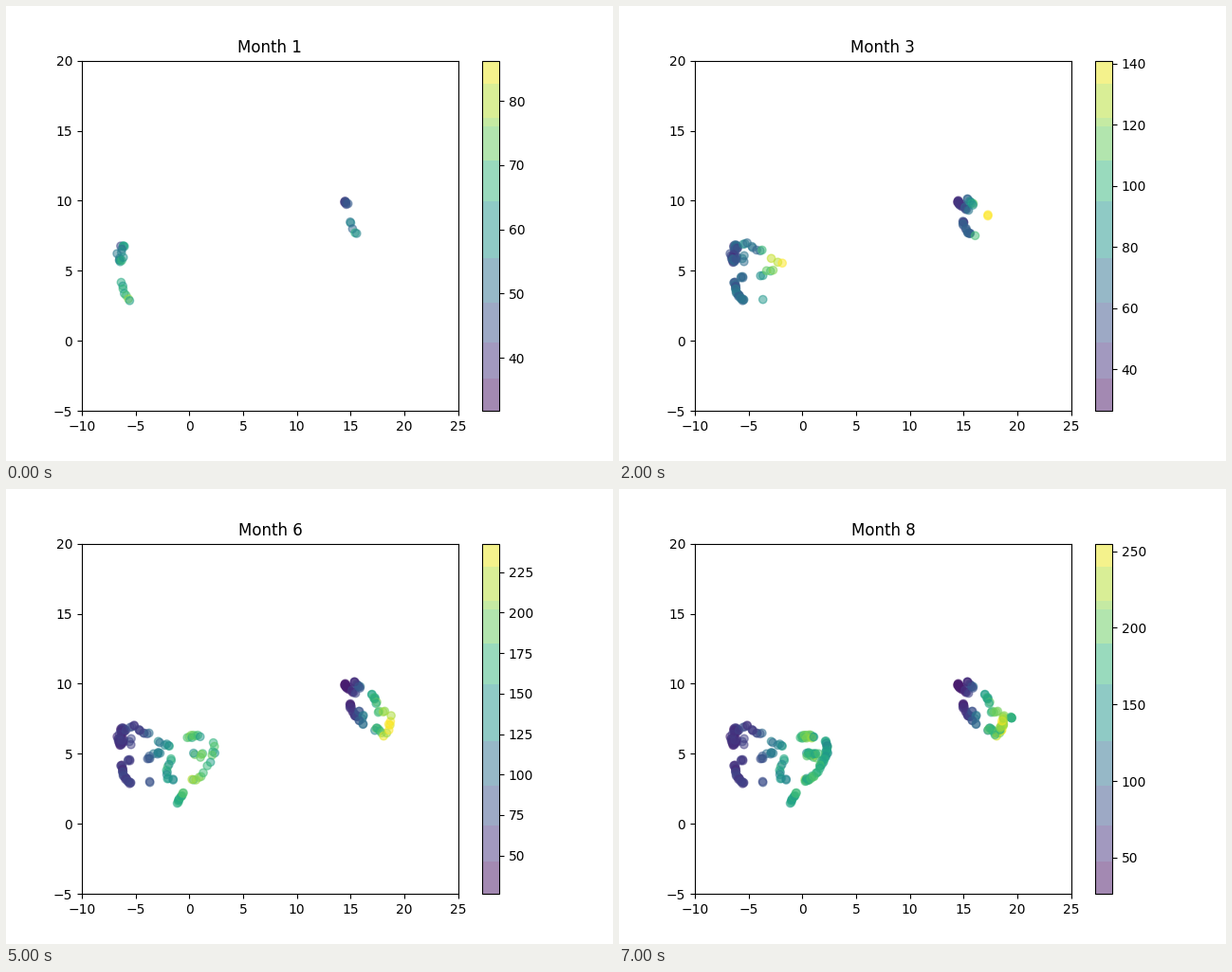
A matplotlib script for the animation above (8000 ms loop, 640 by 480 pixels).

```python
import numpy as np
import matplotlib.pyplot as plt
from matplotlib.animation import FuncAnimation
from matplotlib.cm import ScalarMappable
from matplotlib.colors import ListedColormap, Normalize

ALPHA = 0.5
MONTHS = 8
rng = np.random.default_rng(7)

# Each path: key points, jitter, {month: number of new dots}
WEST = [
    ([(-6.5, 6.8), (-6.0, 6.7), (-6.6, 6.1), (-6.5, 5.7), (-6.0, 6.0)], 0.13,
     {1: 13, 2: 10, 3: 12, 4: 6}),
    ([(-6.35, 4.3), (-6.1, 3.4), (-5.4, 2.8)], 0.07, {1: 7, 2: 8, 3: 7}),
    ([(-5.7, 6.9), (-5.0, 7.0), (-4.4, 6.4), (-3.4, 6.6)], 0.08,
     {2: 3, 3: 5, 4: 2, 5: 1}),
    ([(-5.5, 6.2), (-5.5, 5.5)], 0.1, {2: 1, 3: 2}),
    ([(-5.8, 4.55), (-5.5, 4.5)], 0.08, {2: 2, 3: 2}),
    ([(-4.0, 4.5), (-3.4, 5.0), (-2.4, 5.0)], 0.1, {2: 2, 3: 3, 4: 2, 5: 2}),
    ([(-3.2, 5.8), (-2.2, 5.7), (-1.8, 5.4)], 0.12, {3: 3, 4: 2, 5: 1}),
    ([(-1.5, 4.8), (-2.1, 4.0), (-2.1, 3.3), (-1.3, 3.1)], 0.07, {4: 5, 5: 6}),
    ([(-3.7, 3.0)], 0.06, {2: 1, 4: 1}),
    ([(-1.2, 1.4), (-0.5, 2.3)], 0.06, {4: 2, 5: 8}),
    ([(-0.2, 6.2)], 0.05, {4: 1}),
    ([(-0.2, 6.2), (1.15, 6.25)], 0.13, {6: 7, 7: 5, 8: 5}),
    ([(0.3, 5.0), (1.4, 4.8)], 0.2, {5: 2, 6: 3, 7: 5, 8: 6}),
    ([(2.2, 6.0), (2.3, 5.0), (1.5, 3.9)], 0.12, {5: 1, 6: 6, 7: 8, 8: 10}),
    ([(0.25, 3.1), (0.6, 3.2), (1.6, 3.7)], 0.1, {5: 2, 6: 4, 7: 4, 8: 6}),
]
EAST = [
    ([(14.4, 10.0), (14.7, 9.7)], 0.08, {1: 8, 2: 3, 3: 2}),
    ([(14.8, 9.7), (15.5, 9.3)], 0.08, {2: 3, 3: 4}),
    ([(15.2, 10.2), (16.0, 9.7)], 0.08, {2: 3, 3: 4, 4: 2}),
    ([(14.9, 8.7), (15.0, 8.3), (15.4, 7.7), (15.7, 7.7)], 0.1,
     {1: 5, 2: 4, 3: 5, 4: 4}),
    ([(16.9, 9.4), (17.5, 8.5)], 0.06, {2: 1, 3: 1, 4: 3, 5: 3}),
    ([(15.6, 8.1), (16.2, 7.8), (15.8, 7.3), (16.4, 7.0)], 0.07,
     {3: 1, 4: 4, 5: 4}),
    ([(17.1, 6.7), (17.6, 6.8), (18.1, 6.25)], 0.08, {4: 1, 5: 6, 8: 3}),
    ([(17.4, 8.0), (18.3, 8.1)], 0.1, {5: 2, 6: 2, 8: 1}),
    ([(18.2, 6.5), (18.6, 7.0), (18.8, 7.8)], 0.14, {5: 1, 6: 5, 7: 7, 8: 6}),
    ([(19.4, 7.6)], 0.07, {7: 4, 8: 1}),
]

# Typical value along x for each region
WEST_TREND = [-6.5, -4, -2, 0.5, 2.3], [60, 80, 150, 200, 160]
EAST_TREND = [14.4, 15.5, 16.3, 17.3, 18.6, 19.4], [40, 65, 125, 180, 225, 165]

# Top of the colour scale in each month
HIGH = [86.3, 120.2, 140.9, 221.6, 242.55, 242.55, 252, 255]


def low(month):
    return 31.7 if month < 3 else 26.3


def scatter_along(points, jitter, n, trend):
    """Place n jittered dots (x, y, value) along a path."""
    points = np.array(points)
    t = (np.arange(n) + 0.5) / n * (len(points) - 1)
    knots = np.arange(len(points))
    x = np.interp(t, knots, points[:, 0]) + rng.uniform(-jitter, jitter, n)
    y = np.interp(t, knots, points[:, 1]) + rng.uniform(-jitter, jitter, n)
    value = np.interp(x, *trend) * rng.normal(1, 0.11, n)
    return np.column_stack([x, y, value])


def new_dots(month):
    return np.vstack([
        scatter_along(points, jitter, counts[month], trend)
        for paths, trend in ((WEST, WEST_TREND), (EAST, EAST_TREND))
        for points, jitter, counts in paths if month in counts])


months = [new_dots(m) for m in range(1, MONTHS + 1)]

# Stepped colours of the bar, blended with the white behind it
edges = np.array([0, 0.094, 0.196, 0.309, 0.439, 0.598,
                  0.715, 0.812, 0.837, 0.932, 1])
viridis = plt.get_cmap("viridis")
mids = (edges[:-1] + edges[1:]) / 2
steps = np.searchsorted(edges, (np.arange(256) + 0.5) / 256) - 1
banded = ListedColormap(1 - ALPHA + ALPHA * viridis(mids[steps]))

fig, ax = plt.subplots(figsize=(6.4, 4.8), dpi=100)
norm = Normalize(low(1), HIGH[0])
x, y, value = months[0].T
dots = ax.scatter(x, y, c=value, cmap=viridis, norm=norm, alpha=ALPHA)
fig.colorbar(ScalarMappable(norm, banded), ax=ax)
ax.set_xlim(-10, 25)
ax.set_ylim(-5, 20)
title = ax.set_title("Month 1")


def update(i):
    data = np.vstack(months[:i + 1])
    dots.set_offsets(data[:, :2])
    dots.set_array(data[:, 2])
    norm.vmin, norm.vmax = low(i + 1), HIGH[i]
    title.set_text(f"Month {i + 1}")
    return dots, title


anim = FuncAnimation(fig, update, frames=MONTHS, interval=1000,
                     repeat=True, repeat_delay=0)
plt.show()
```
